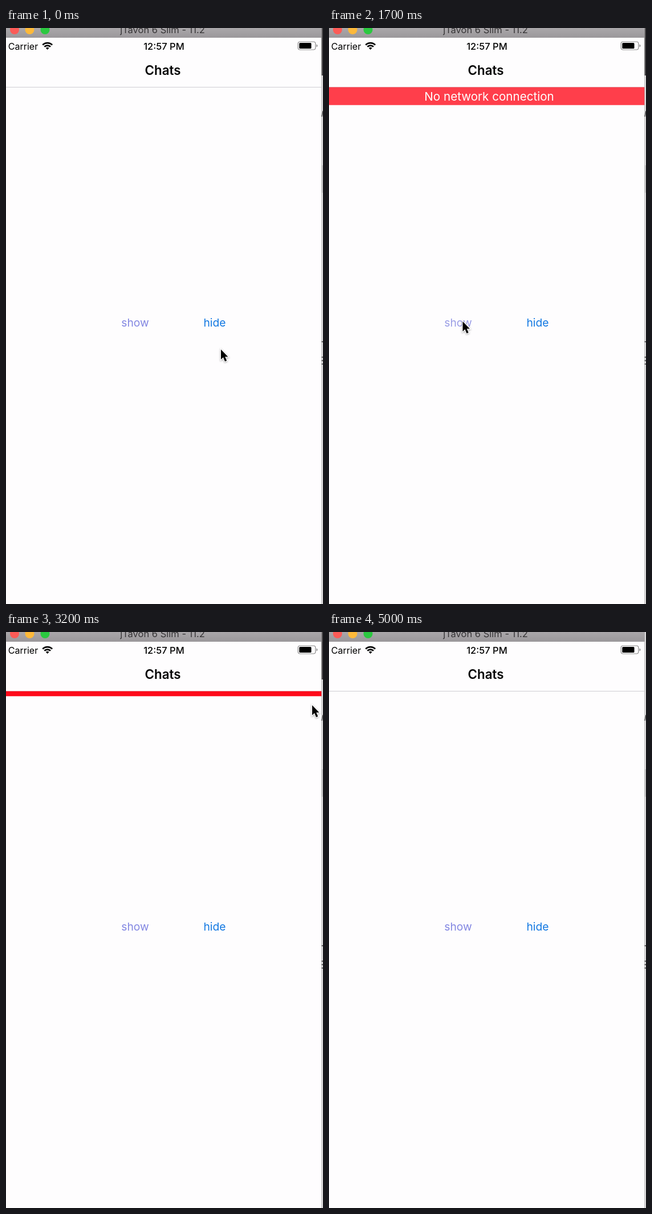
Write an HTML page that moves like this. It is 556x1007 px and loops after 5.2 s.

```html
<!DOCTYPE html>
<html lang="en">
<head>
<meta charset="utf-8">
<title>Network banner</title>
<style>
  html, body { margin: 0; height: 100%; overflow: hidden; background: #fefdfe; }
  svg { display: block; width: 100vw; height: 100vh; }
  text { font-family: Inter, Roboto, sans-serif; text-anchor: middle; }
  #cursor { filter: drop-shadow(0 1.5px 1.5px rgba(0, 0, 0, .35)); }
</style>
</head>
<body>
<svg viewBox="0 0 556 1007">
  <defs>
    <linearGradient id="bar" x2="0" y2="1">
      <stop stop-color="#aaa7aa"/><stop offset="1" stop-color="#9a979a"/>
    </linearGradient>
    <clipPath id="clip"><rect id="clipBox" y="103.5" width="553.5"/></clipPath>
  </defs>
  <rect width="556" height="1007" fill="#fefdfe"/>

  <!-- window edge and what lies behind it -->
  <rect x="553.5" width="2.5" height="1007" fill="#e6e5e6"/>
  <rect x="553.5" y="240" width="2.5" height="48" fill="#c9c8c9"/>
  <rect x="553.5" width="1" height="1007" fill="#aaa9aa"/>
  <rect id="backdrop" x="553.5" width="2.5" height="83" fill="#484648"/>
  <path d="M556 145l-2 10M553.5 548.5h2.5M553.5 575.5h2.5M553.5 581.5h2.5M553.5 587.5h2.5" stroke="#333" stroke-width="1.3"/>

  <!-- title bar -->
  <rect width="553.5" height="17" fill="url(#bar)"/>
  <circle cx="15" cy="3" r="8" fill="#fc5b57"/>
  <circle cx="41.5" cy="3" r="8" fill="#fdb93a"/>
  <circle cx="68.5" cy="3" r="8" fill="#2bc840"/>
  <text x="274.5" y="9" font-size="16.5" fill="#373537">jTavon 6 Slim - 11.2</text>

  <!-- status bar -->
  <text x="30" y="37.5" font-size="16.1">Carrier</text>
  <text x="277" y="37.5" font-size="16.5" font-weight="500">12:57 PM</text>
  <g fill="none" stroke="#000" stroke-width="2.7">
    <path d="M64.3 29.6a11.8 11.8 0 0 1 16.8 0M67.4 32.8a7.4 7.4 0 0 1 10.6 0"/>
    <path d="M72.7 38l-2.8-2.9a4 4 0 0 1 5.6 0z" fill="#000" stroke="none"/>
  </g>
  <rect x="512.2" y="24" width="30.6" height="14" rx="3.5" fill="none" stroke="#8a898a" stroke-width="1.2"/>
  <rect x="514.3" y="26" width="21.2" height="10" rx="1.5"/>
  <path d="M544.5 28.5q2 .8 2 2.5t-2 2.5z" fill="#8a898a"/>

  <!-- screen -->
  <text x="275" y="82" font-size="22.3" font-weight="600">Chats</text>
  <rect y="103" width="553.5" height="1" fill="#cfced2"/>
  <text id="show" x="226.5" y="521.5" font-size="19.3">show</text>
  <text x="366" y="521.5" font-size="19.3" fill="#1278e2">hide</text>

  <g id="banner" clip-path="url(#clip)">
    <rect y="103" width="553.5" height="42" fill="#ff0a1a"/>
    <text id="message" x="281" font-size="20.6" fill="#fff">No network connection</text>
    <path id="close" d="M522 115.5l17 17m0-17l-17 17" stroke="#fff" stroke-width="2.6"/>
  </g>

  <path id="cursor" d="M0 0V17.5L4 13.8 7 21 10.2 19.6 7.2 12.8H12.4Z" stroke="#fff" stroke-width="2.4" paint-order="stroke"/>
</svg>
<script>
const LOOP = 5200, STEP = 100;
const $ = id => document.getElementById(id);
const ease = {
  linear: p => p,
  in: p => p * p,
  out: p => p * (2 - p),
  both: p => p * p * (3 - 2 * p)
};

// time, x, y, easing used to arrive there
const path = [
  [0, 377, 562],
  [600, 234.5, 513, 'both'],
  [1800, 234.5, 513, 'linear'],
  [2200, 501, 122, 'both'],
  [2400, 524, 120, 'out'],
  [2700, 534, 127, 'both'],
  [3200, 537, 128, 'linear'],
  [3300, 537, 128, 'linear'],
  [3600, 538, 197, 'in'],
  [4000, 405.5, 474, 'out'],
  [4100, 405.5, 474, 'linear'],
  [4700, 404, 140, 'both'],
  [4900, 404, -40, 'linear'],
  [LOOP, 404, -40, 'linear']
];

const progress = (t, start, length) =>
  ease.both(Math.min(1, Math.max(0, (t - start) / length)));

function cursorAt(t) {
  const i = path.findIndex(k => k[0] > t);
  const [t0, x0, y0] = path[i - 1], [t1, x1, y1, kind] = path[i];
  const p = ease[kind]((t - t0) / (t1 - t0));
  return [x0 + (x1 - x0) * p, y0 + (y1 - y0) * p];
}

function draw(t) {
  const opened = progress(t, 1490, 300), closed = progress(t, 2990, 300);
  const height = 40 * (opened - closed);
  $('clipBox').setAttribute('height', height);
  $('banner').setAttribute('opacity', opened);
  $('message').setAttribute('y', 111 + height / 2);
  $('message').setAttribute('opacity', Math.max(0, 1 - closed * 1.5));
  $('close').setAttribute('opacity', t >= 1800 && t < 3000 ? 1 : 0);
  $('show').setAttribute('fill', t >= 1400 && t < 1800 ? '#9a9de6' : '#8387e2');
  $('backdrop').setAttribute('opacity', t < 4800 ? 1 : 0);
  $('cursor').setAttribute('transform', `translate(${cursorAt(t)})`);
}

const begin = performance.now();
function tick() {
  const t = (performance.now() - begin) % LOOP;
  draw(Math.floor(t / STEP) * STEP);
  requestAnimationFrame(tick);
}
tick();
</script>
</body>
</html>
```
